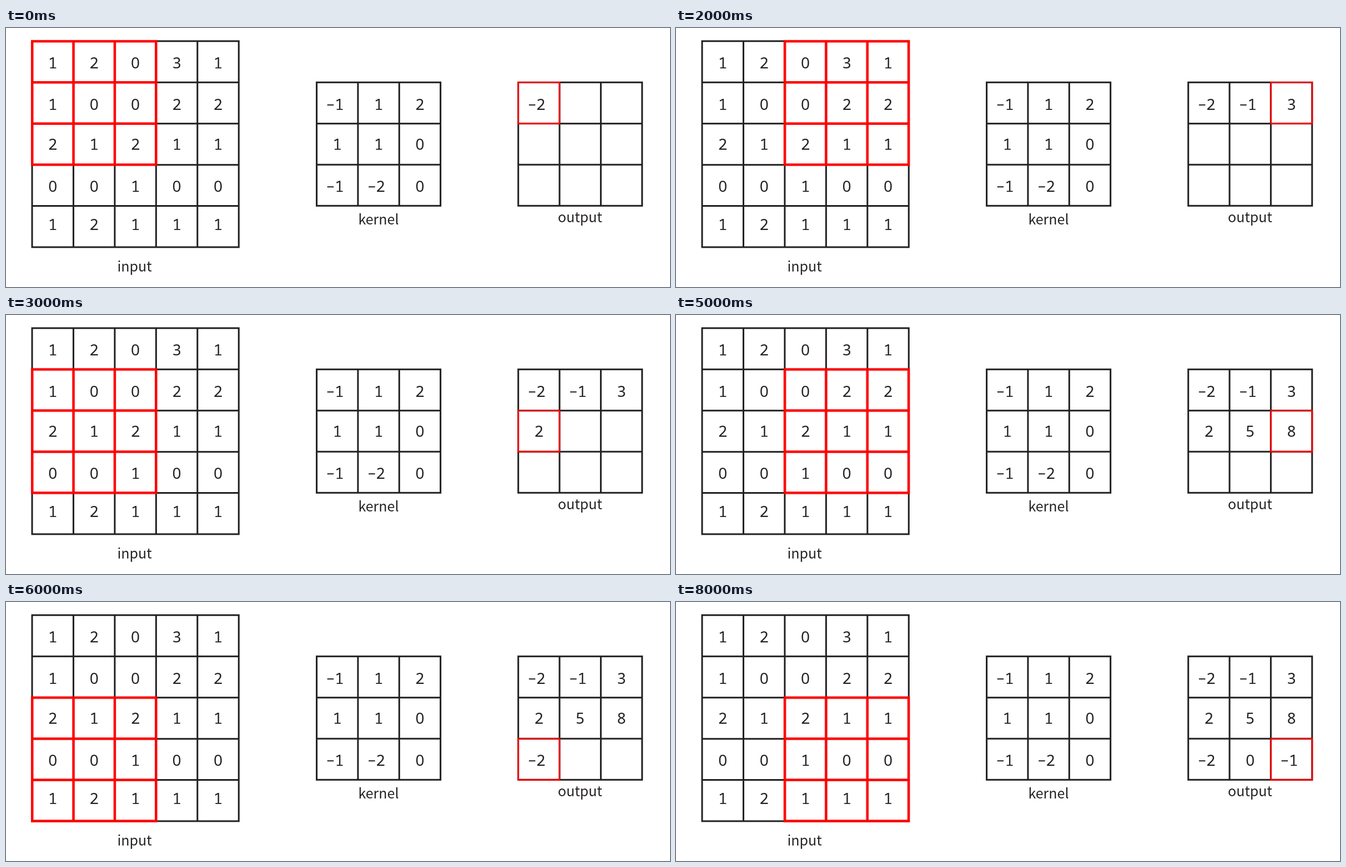
Animation of 1196 by 468 pixels, one loop 9 s. Source, as an HTML page:

```html
<!DOCTYPE html>
<html lang="en">
<head>
<meta charset="utf-8">
<title>Convolution</title>
<style>
  html, body { margin: 0; width: 100%; height: 100%; overflow: hidden; background: #fff; }
  svg { display: block; width: 1196px; height: 468px; }
  path { fill: none; stroke: #221f20; stroke-width: 3; stroke-linecap: square; }
  text { fill: #262223; text-anchor: middle; }
  .num { font: 28px "Noto Sans Mono", "DejaVu Sans Mono", monospace; }
  .zero { font-family: "Noto Sans", "Open Sans", sans-serif; }
  .minus { font-size: 25px; font-weight: 500; }
  .label { font: 25px "Noto Sans CJK SC", "Noto Sans CJK JP", "Noto Sans", sans-serif; }
  .window path { stroke: #f00; stroke-width: 4.5; }
  .cell path { stroke: #f00; stroke-width: 2.6; }
  .across { animation: across 3s steps(3) infinite; }
  .down { animation: down 9s steps(3) infinite; }
  @keyframes across { to { transform: translateX(223.05px); } }
  @keyframes down { to { transform: translateY(223.05px); } }
</style>
</head>
<body>
<svg viewBox="0 0 1196 468">
  <g id="scene"></g>
  <g class="down"><g class="across window" id="window"></g></g>
  <g class="down"><g class="across cell" id="cell"></g></g>
  <g id="numbers"></g>
  <text class="label" x="231.5" y="440">input</text>
  <text class="label" x="671" y="355">kernel</text>
  <text class="label" x="1034" y="351">output</text>
</svg>
<script>
const PITCH = 74.35;
const BASELINES = [73, 148, 220, 296, 365];
const $ = id => document.getElementById(id);
const parse = rows => rows.split('/').map(row => row.trim().split(' ').map(Number));

function add(parent, tag, attrs, content = '') {
  const el = document.createElementNS('http://www.w3.org/2000/svg', tag);
  for (const key in attrs) el.setAttribute(key, attrs[key]);
  el.textContent = content;
  parent.append(el);
  return el;
}

function grid(parent, x, y, n, pitch = PITCH) {
  const size = n * pitch;
  let d = '';
  for (let i = 0; i <= n; i++) {
    const at = i * pitch;
    d += `M${x} ${y + at}h${size}M${x + at} ${y}v${size}`;
  }
  add(parent, 'path', { d });
}

function number(value, x, y) {
  const negative = value < 0;
  const text = add($('numbers'), 'text', {
    class: value === 0 ? 'num zero' : 'num',
    x: negative ? x - 4 : x,
    y
  });
  if (negative) add(text, 'tspan', { class: 'minus' }, '\u2212');
  text.append(Math.abs(value));
  return text;
}

// Returns the text elements in reading order
function fill(rows, x, firstRow, pitch = PITCH) {
  return rows.flatMap((row, r) => row.map((value, c) =>
    number(value, x + (c + 0.5) * pitch, BASELINES[firstRow + r])));
}

function convolve(image, weights) {
  const span = image.length - weights.length + 1;
  const sumAt = (r, c) => weights.flat().reduce((sum, w, i) =>
    sum + w * image[r + Math.floor(i / 3)][c + i % 3], 0);
  return Array.from({ length: span }, (_, r) =>
    Array.from({ length: span }, (_, c) => sumAt(r, c)));
}

const input = parse('1 2 0 3 1 / 1 0 0 2 2 / 2 1 2 1 1 / 0 0 1 0 0 / 1 2 1 1 1');
const kernel = parse('-1 1 2 / 1 1 0 / -1 -2 0');

grid($('scene'), 47, 23.8, 5, 74.45);
grid($('scene'), 559.6, 98.3, 3);
grid($('scene'), 922.7, 98.3, 3);
grid($('window'), 47.2, 24, 3);
grid($('cell'), 922.7, 98.3, 1);

fill(input, 47, 0, 74.45);
fill(kernel, 559.6, 1);

// Each result appears when the window reaches it and stays until the loop ends
const style = add(document.head, 'style', {});
const sheet = document.createElement('style');
style.replaceWith(sheet);
fill(convolve(input, kernel), 922.7, 1).forEach((el, i) => {
  if (!i) return;
  sheet.append(`@keyframes show${i} { 0% { opacity: 0 } ${i / 9 * 100}%, 100% { opacity: 1 } }\n`);
  el.style.animation = `show${i} 9s step-end infinite`;
});
</script>
</body>
</html>
```
